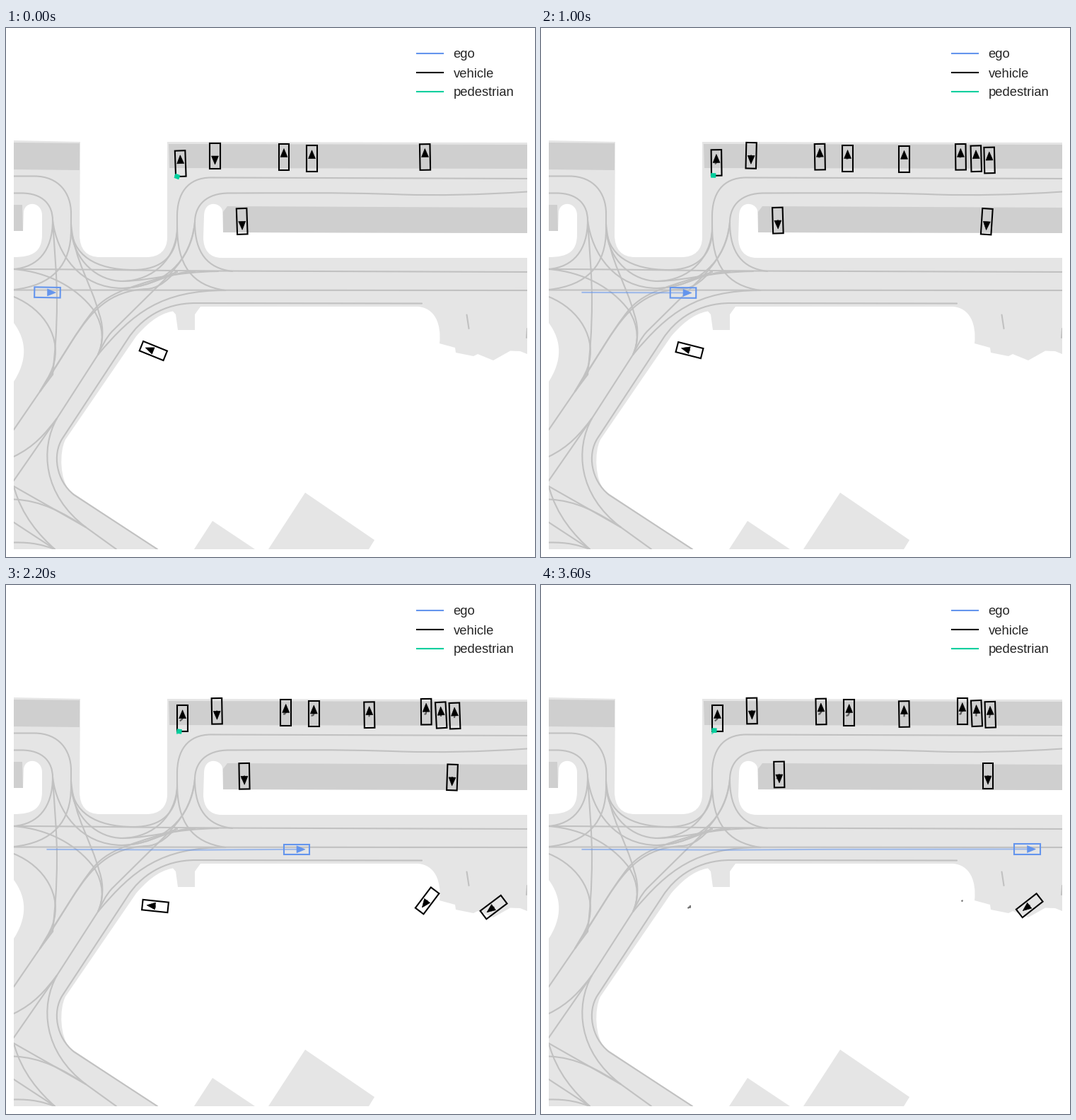
Animation, 748 px wide and 748 px high, one loop 3800 ms. Source, as a matplotlib script:

```python
import numpy as np
import matplotlib.pyplot as plt
from matplotlib.animation import FuncAnimation
from matplotlib.patches import PathPatch, Polygon
from matplotlib.path import Path

SIZE, DPI = 748, 100
LO, HI = 11, 737
FRAMES, STEP = 19, 200
LIGHT, DARK, LANE = "#e5e5e5", "#cfcfcf", "#c1c1c1"
EGO, CAR, PED = "#6495ed", "#000000", "#00cf9d"
LW = 1.5

fig = plt.figure(figsize=(SIZE / DPI, SIZE / DPI), dpi=DPI, facecolor="white")
ax = fig.add_axes([LO / SIZE, 1 - HI / SIZE, (HI - LO) / SIZE, (HI - LO) / SIZE])
ax.set_xlim(LO, HI)
ax.set_ylim(HI, LO)
ax.axis("off")


def curve(text):
    """Build a Path from M, L, C and Z commands."""
    verts, codes = [], []
    kinds = {"M": Path.MOVETO, "L": Path.LINETO, "C": Path.CURVE4}
    for part in text.replace("M", "|M").replace("L", "|L").replace("C", "|C").replace("Z", "|Z").split("|")[1:]:
        if part[0] == "Z":
            verts.append(verts[0])
            codes.append(Path.CLOSEPOLY)
            continue
        pts = np.array(part[1:].split(), float).reshape(-1, 2)
        verts.extend(map(tuple, pts))
        codes.extend([kinds[part[0]]] * len(pts))
    return Path(verts, codes)


def area(text, color):
    ax.add_patch(PathPatch(curve(text), fc=color, ec="none", zorder=1))


def lane(text):
    ax.add_patch(PathPatch(curve(text), fc="none", ec=LANE, lw=LW, zorder=2,
                           capstyle="round", joinstyle="round"))


# drivable ground
area("M11 159 L105 161 L104 292 C104 313 114 324 133 324 L199 324"
     "C217 324 228 314 228 296 L228 161 L737 162 L737 461 L727 457 L713 456.5 L689 470"
     "L667 461 L661 464 L636 459 L635 452 L613 446 C616 418 606 396 583 394"
     "L275 394 L267 405 L267 427 L243 427 L240 405 L236 400.5 C214 404 196 422 184 436"
     "L84 582 C75 600 76 640 91 655 L214 737 L11 737 L11 500 C30 470 30 443 11 417 Z", LIGHT)
area("M266 737 L292 697 L352 737 Z", LIGHT)
area("M371 737 L423 657 L521 724 L513 737 Z", LIGHT)

# islands
area("M11 287 L24 287 L25 260 C27 244 50 245 51 264 L51 292 C51 316 38 324 11 324 Z", "white")
area("M280 266 C280 243 303 246 306 258 L307 289 L737 290 L737 325 L305 325"
     "C288 325 279 314 279 296 Z", "white")

# parking strips
area("M11 162 L104 163 L104 201 L11 200 Z", DARK)
area("M230 164 L737 165 L737 199 L231 198 Z", DARK)
area("M11 250 L23 250 L24 287 L11 287 Z", DARK)
area("M307 260 L313 252 L737 254 L737 290 L307 289 Z", DARK)

for text in (
    # left access road
    "M11 209.5 L40 209.5 C75 209.5 92 234 92 262 L92 285 C92 335 66 364 11 370",
    "M11 233.5 L22 233.5 C52 233.5 66 250 66 272 C66 315 45 338 11 341",
    "M92 278 C92 322 128 342 180 342",
    "M92 285 C96 330 130 358 165 358 C210 357 235 345 300 344",
    "M66 272 C72 320 105 368 165 368 C205 367 228 345 267 344",
    "M92 278 C97 330 120 360 132 405 C139 425 137 446 130 462",
    "M66 272 C69 320 72 350 72 385 C72 430 69 460 66 490",
    # right access road
    "M737 213 L290 211.5 C256 211.5 242 235 242 266 L242 285 C242 322 220 342 180 342",
    "M737 231.5 C670 236 610 237 560 235.5 C470 232 380 233.5 315 233.5 C284 233.5 267 250 267 275",
    "M242 285 C240 325 210 357 165 358",
    "M242 280 C242 335 262 364 310 371",
    "M267 275 C267 318 285 340 320 344",
    "M267 275 C262 330 222 366 165 368",
    "M267 275 C263 310 248 332 225 355 L150 429 C140 440 136 450 130 462",
):
    lane(text)

for text in (
    # through lanes
    "M11 341 C110 341 200 343 300 343.5 L737 345",
    "M11 370.5 L737 371",
    "M11 341 C60 345 100 367 124 399 C139 422 138 446 130 462",
    "M11 380 C55 398 80 440 66 480 C62 492 54 503 48 514",
    "M11 568 L48 514 C80 466 100 428 124 399 C148 370 190 364 242 345",
    "M48 514 L95 440 C120 402 145 371 200 369 C225 367 240 340 242 345",
    "M66 490 L48 514",
    "M310 371 C220 371 180 402 130 462",
    "M11 640 L72 552 L130 462",
    "M588 389.5 L268 389 C222 389 190 412 172 440 L80 580 C65 603 71 640 96 660 L214 737",
    # southern junction
    "M72 552 C48 595 52 660 113 706",
    "M11 606 C40 592 55 574 72 552",
    "M11 648 L113 706 L156 737",
    "M11 666.5 C50 668 80 685 113 706",
    "M11 648 C22 690 48 718 69 737",
    "M11 699 L69 737",
    "M11 727.5 C38 727 52 731 69 737",
    "M651.5 405.5 L654.5 425",
    "M737 425 L736 438",
):
    lane(text)

# legend
for i, (name, color) in enumerate((("ego", EGO), ("vehicle", CAR), ("pedestrian", PED))):
    y = 36.2 + 27 * i
    ax.plot([581.3, 618], [y, y], color=color, lw=LW, solid_capstyle="projecting")
    ax.text(632.7, y + 6.3, name, family="Liberation Sans", size=13.2, color="#262626",
            va="baseline", clip_on=False)

KEYS = [0, 800, 1400, 1800, 2200, 2800, 3600]
TIMES = np.arange(FRAMES) * STEP


class Agent:
    """Oriented box with a heading arrow and a trail, seen from start until end."""

    def __init__(self, xs, ys, headings, color=CAR, start=0, end=9999, size=(36.5, 14.5),
                 arrow=(12, 5), keys=KEYS, fill=False, z=4):
        def track(v):
            return np.interp(TIMES, keys if len(v) == len(keys) else KEYS, v)

        self.x, self.y = track(xs), track(ys)
        self.h = np.radians(track(headings))
        self.first, self.start, self.end = start // STEP, start, end
        a, b = size[0] / 2, size[1] / 2
        self.box_pts = np.array([(-a, -b), (a, -b), (a, b), (-a, b)])
        tip, half = arrow
        self.arrow_pts = np.array([(tip, 0), (0, half), (0, -half)])
        self.trail, = ax.plot([], [], color=color, lw=LW, alpha=0.55, zorder=z)
        self.box = ax.add_patch(Polygon(self.box_pts, fc=color if fill else "none", ec=color,
                                        lw=LW, joinstyle="miter", zorder=z + 0.1))
        self.arrow = ax.add_patch(Polygon(self.arrow_pts, fc=color, ec=color, lw=0.4,
                                          zorder=z + 0.2))

    def place(self, pts, k):
        c, s = np.cos(self.h[k]), np.sin(self.h[k])
        return pts @ np.array([[c, -s], [s, c]]) * [1, 1] + [self.x[k], self.y[k]]

    def update(self, k):
        shown = self.start <= TIMES[k] < self.end
        self.box.set_visible(shown)
        self.arrow.set_visible(shown)
        if shown:
            self.box.set_xy(self.place(self.box_pts, k))
            self.arrow.set_xy(self.place(self.arrow_pts, k))
        last = k + 1 if shown else min(k + 1, self.end // STEP)
        self.trail.set_data(self.x[self.first:last], self.y[self.first:last])
        return [self.trail, self.box, self.arrow]


def still(v):
    return [v] * len(KEYS)


agents = [
    # upper row
    Agent([246.7, 247.7, 248.8, 249.2, 249.6, 249.8, 249.5],
          [191.7, 190.7, 190, 189.2, 188.7, 188.3, 188.5], [92, 91, 90, 90, 90, 90, 90]),
    Agent([295.5, 297, 297.5, 297.8, 298.2, 298.5, 298.2],
          [181, 180.4, 180.2, 179, 178.3, 177.7, 178], [-90, -91.5, -91, -89, -89, -89, -89]),
    Agent([393, 394.2, 394.6, 395, 395.7, 396.3, 396],
          [182.5, 182.5, 181.6, 180.6, 180.4, 179.5, 179], [90, 91, 91, 90, 90, 91, 91]),
    Agent([432.5, 433, 434.7, 434.8, 435.3, 436, 435.7],
          [184.7, 184.7, 184, 182.3, 182, 181.3, 180.5], still(90)),
    Agent([513.5, 513.5, 513.5, 513.6, 513.8, 514.3, 513.5],
          [185.3, 185.3, 185.3, 184.3, 183.7, 182.3, 182.5], [90, 90, 90, 91, 91, 93, 91], start=200),
    Agent([592.5, 593.3, 593.7, 593.8, 594.2, 594.5, 595.8],
          [182.5, 182.5, 182, 181.6, 179.2, 179, 178.5], [91, 91, 90, 90, 90.5, 90, 90]),
    Agent([615.3, 615.3, 615.2, 615.2, 615.2, 615.2, 616],
          [184.7, 184.7, 184.7, 184.2, 184, 183, 181.5], [91, 91, 92.5, 93, 93, 94, 92.5], start=200),
    Agent([634, 634, 634.2, 634.3, 634.5, 634.7, 635.3],
          [187, 187, 187, 186, 185, 184.5, 183.3], [91, 91, 92, 91, 92, 91, 91.5], start=200),
    # middle row
    Agent([333.7, 334.7, 335.2, 336, 337, 337.2, 336.8],
          [273.4, 272.2, 272, 271, 270.3, 269.8, 268], [-88, -88, -89, -89, -89, -89, -89]),
    Agent([630.2, 630.2, 630.5, 630.8, 631, 631.2, 632],
          [273.7, 273.7, 273.7, 272.7, 272, 271.2, 270], [-94, -94, -93, -92.5, -92, -91.5, -90], start=200),
    # lower lot
    Agent([208.3, 209.5, 211, 211, 211, 211, 211],
          [456.5, 455.4, 456, 454, 454, 454, 454], [158, 164, 169, 173, 174, 174, 174], end=2400),
    Agent([595.4, 595.4, 595.2, 595.4, 595.6, 595.6, 595.6],
          [446.5, 446.5, 446.8, 446.4, 446.4, 446.4, 446.4], still(233), start=1600, end=2400),
    Agent([689.7, 689.7, 689.7, 689.7, 689.5, 689.6, 690.7],
          [456.2, 456.2, 456.2, 456, 455.6, 455.3, 453.2], [218, 218, 218, 217, 217, 217, 218], start=1400),
    # pedestrian
    Agent([242, 243.5, 244.2, 244.5, 245, 245, 245], [210, 208.6, 208.2, 207.4, 207, 206.8, 205.6],
          [160, 178, 178, 170, 172, 175, 178], PED, size=(5, 4.5), arrow=(4, 2), fill=True, z=6),
    # ego
    Agent([58.5, 83.2, 110, 139, 170.3, 201, 234, 268, 302.5, 337.5, 411, 526.5, 687.5],
          [373.9, 374.3, 374.7, 374.2, 373.8, 373.7, 373.5], [-1, -0.5, -0.3, 0, 0, 0, 0],
          EGO, keys=[*range(0, 2000, 200), 2200, 2800, 3600], z=5),
]


def draw(k):
    return [artist for agent in agents for artist in agent.update(k)]


anim = FuncAnimation(fig, draw, frames=FRAMES, interval=STEP, repeat=True, repeat_delay=0)
plt.show()
```
